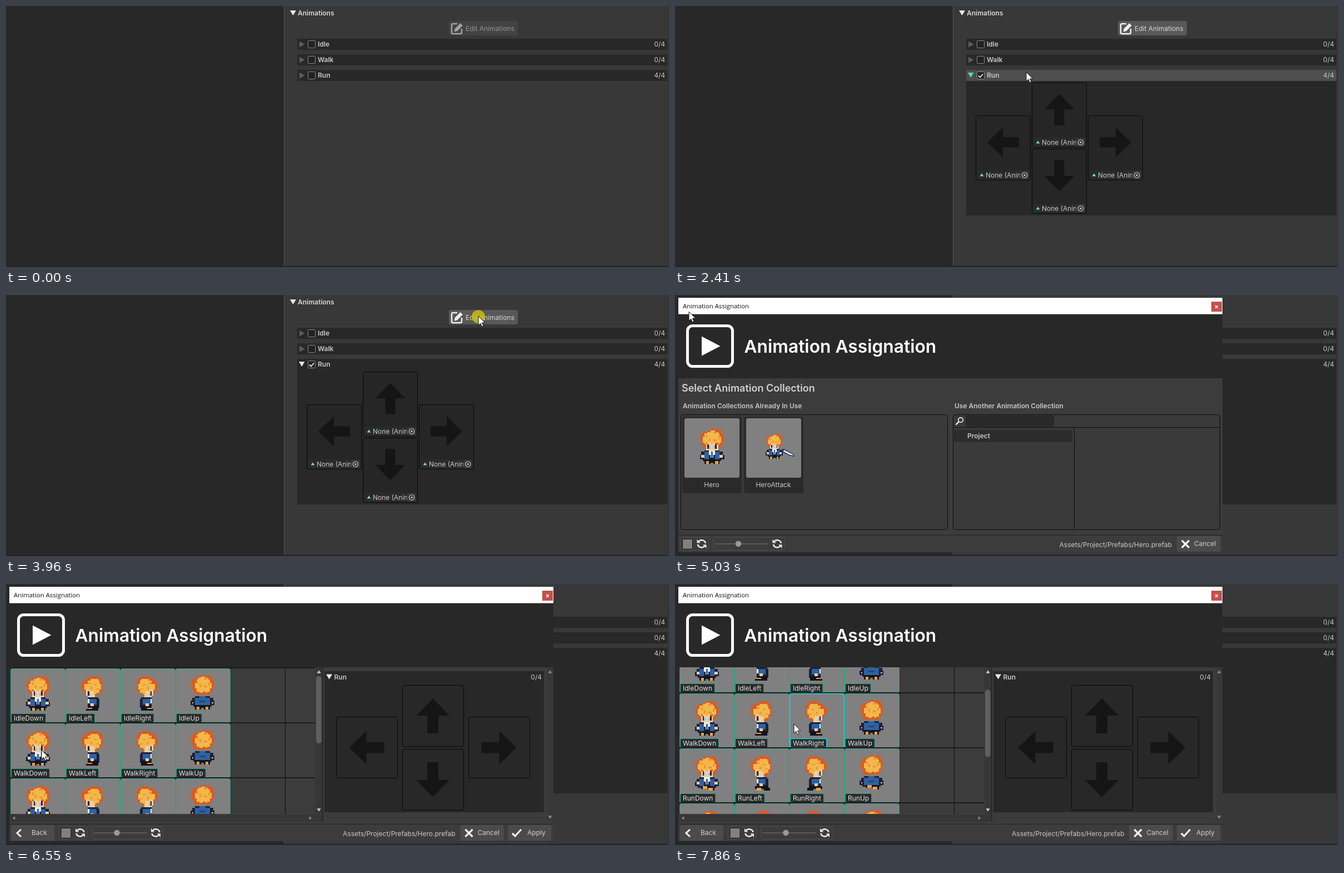
Recreate the animation shown at these times as an HTML page. Size 1193 by 470 pixels, loop 8 s.

```html
<!DOCTYPE html>
<html lang="en">
<head>
<meta charset="utf-8">
<title>Animation Assignation</title>
<style>
html, body { margin: 0; width: 100%; height: 100%; overflow: hidden; background: #282828; }
svg { display: block; width: 1193px; height: 470px; font-family: Inter, sans-serif; }
text { white-space: pre; }
.title { font-family: "Open Sans", sans-serif; }
.sprite { shape-rendering: crispEdges; }
.tile rect { stroke: #2ba487; }
.tile.on rect { stroke: #16d6d8; stroke-width: 1.6; }
.row .bar { fill: #282828; }
.row.on .bar { fill: #4e4e4e; }
.row .tri { fill: #5c5c5c; }
.row.open .tri { fill: #e4e4e4; }
.row.on .tri { fill: #3f8575; }
.row.on.open .tri { fill: #4fdcbc; }
</style>
</head>
<body>
<svg id="stage" viewBox="0 0 1193 470"></svg>
<script>
const LOOP = 8000, CELL = 99;
const TOGGLE = 1670, OPEN = 4060, ASSIGN = 6550;

// ---- drawing helpers ----
const rect = (x, y, w, h, fill, rx = 0, stroke = '') =>
  stroke
    ? `<rect x="${x + .5}" y="${y + .5}" width="${w - 1}" height="${h - 1}" rx="${rx}" fill="${fill}" stroke="${stroke}"/>`
    : `<rect x="${x}" y="${y}" width="${w}" height="${h}" rx="${rx}" fill="${fill}"/>`;
const path = (d, fill, more = '') => `<path d="${d}" fill="${fill}" ${more}/>`;
const line = (d, color, width = 1) => path(d, 'none', `stroke="${color}" stroke-width="${width}"`);
const text = (x, y, s, { size = 12, weight = 400, fill = '#c8c8c8', end = false, more = '' } = {}) =>
  `<text x="${x}" y="${y}" font-size="${size}" font-weight="${weight}" fill="${fill}" ${end ? 'text-anchor="end"' : ''} ${more}>${s}</text>`;
const group = (id, body, more = '') => `<g id="${id}" ${more}>${body}</g>`;
const at = (x, y, body, more = '') => `<g transform="translate(${x} ${y}) ${more}">${body}</g>`;
const bold = { weight: 600 };

const arrow = (x, y, deg, size = 1) =>
  at(x, y, path('M0-31.5 30-.5H10V31.5H-10V-.5H-30Z', '#151515'), `rotate(${deg}) scale(${size})`);

// ---- hero sprites, on a grid of about 16 by 23 units ----
const RED = '#dc5a20', GOLD = '#f2b84c', AMBER = '#f0942e', SKIN = '#f4cda2',
  INK = '#1c2038', BLUE = '#2f62a0', DARK = '#12131c', WHITE = '#e8eef4', BOOT = '#f0a233', EYE = '#8fc4dc';

const hairFront = path('M3 2h2v-1h2v-1h3v1h1v-1h2v1h2v1h-1v1h1v2h1v2h-1v3h-1v2h-1v1h-10v-1h-1v-2h-1v-3h-1v-2h1v-2h1z', RED);
const hairSpots = path('M4 4h1v2h-1zM9 2h2v1h-2zM12 5h1v2h-1zM6 6h1v2h-1zM9 7h2v1h-2z', AMBER);
const coat = path('M3 14h10v1h2v2h1v3h-2v1h-12v-1h-2v-3h1v-2h2z', INK);
const feet = run => run
  ? path('M4 20h8v1h1v2h-4v-1h-5z', DARK) + path('M5 20h3v2h-3zM9 21h3v2h-3z', BOOT)
  : path('M3 20h10v3h-4v-1h-2v1h-4z', DARK) + path('M4 21h2v2h-2zM10 21h2v2h-2z', BOOT);

const front = run => hairFront
  + path('M5 2h2v-1h3v1h2v1h1v2h1v4h-1v1h-1v-1h-2v1h-5v-1h-1v1h-1v-1h-1v-4h1v-2h2z', GOLD) + hairSpots
  + coat
  + path('M4 10h1v-1h2v1h2v-1h1v1h2v4h-8z', SKIN)
  + path('M5 10h1v3h-1zM10 10h1v3h-1z', INK) + path('M6 11h1v2h-1zM9 11h1v2h-1z', EYE)
  + path('M3 15h3v5h-3zM10 15h3v5h-3z', BLUE)
  + path('M6 14h4v3h-1v2h-2v-2h-1z', WHITE) + path('M7.5 15h1v4h-1z', BLUE)
  + path('M1 17h2v2h-2zM13 17h2v2h-2z', SKIN) + feet(run);

const back = run => coat
  + path('M3 15h3v-1h4v1h3v5h-10z', BLUE) + path('M6 17h4v1h-4z', '#23497e')
  + hairFront
  + path('M5 2h2v-1h3v1h2v1h1v2h1v4h-1v2h-2v1h-1v-1h-2v1h-2v-1h-2v-2h-1v-4h1v-2h1z', GOLD) + hairSpots
  + path('M1 18h1v1h-1zM14 18h1v1h-1z', SKIN) + feet(run);

const side = run =>
  path('M2 2h2v-1h2v-1h5v1h2v2h1v2h-1v1h1v4h-1v1h-2v2h-7v-1h-2v-3h-2v-5h2z', RED)
  + path('M4 3h2v-1h5v1h1v2h1v4h-1v2h-2v1h-3v-2h-3v-1h-2v-4h2z', GOLD)
  + path('M4 4h2v1h-2zM8 5h2v1h-2zM10 8h2v1h-2zM6 7h1v2h-1z', AMBER)
  + path('M4 14h7v1h1v6h-8z', INK)
  + path('M3 9h2v1h3v2h1v2h-5v-1h-1z', SKIN)
  + path('M4 10h1v3h-1z', INK) + path('M5 11h1v2h-1z', EYE)
  + path('M5 15h5v4h-5z', BLUE) + path('M4 15h1v3h-1z', WHITE) + path('M6 18h2v2h-2z', SKIN)
  + (run
    ? path('M3 20h9v1h1v2h-4v-1h-6z', DARK) + path('M4 21h3v2h-3z', BOOT)
    : path('M4 20h7v3h-8v-1h1z', DARK) + path('M4 21h3v1h-3z', BOOT));

const sprite = (x, y, size, body, flip) =>
  `<g class="sprite">${at(x, y, body, `scale(${flip ? -size : size} ${size})`)}</g>`;

// ---- icons ----
const refresh = (x, y) => at(x, y,
  line('M-7-1A7 6.5 0 0 1 5.5-4M7 1A7 6.5 0 0 1-5.5 4', '#e6e6e6', 2.6)
  + path('M8.5-8V-1.5H2ZM-8.5 8V1.5H-2Z', '#e6e6e6'), 'scale(-1 1)');
const cross = (x, y) => at(x, y, line('M-6.5-6.5 6.5 6.5M6.5-6.5-6.5 6.5', '#f4f4f4', 3.2));
const tri = (x, y, deg, fill, s = 1) => at(x, y, path('M0-3 4 3H-4Z', fill), `rotate(${deg}) scale(${s})`);

// ---- inspector ----
const rows = [['Idle', '0/4', 59], ['Walk', '0/4', 87], ['Run', '4/4', 115]];

function row([name, count, y], i) {
  return `<g class="row" id="row${i}">`
    + `<rect class="bar" x="524" y="${y}" width="666" height="20"/>`
    + `<path class="tri" d="M528 ${y + 4.5}l9.5 5.5-9.5 5.5z"/>`
    + rect(543, y + 3, 14, 14, '#222', 1, '#8a8a8a')
    + text(561, y + 14, name, bold) + text(1186, y + 14, count, { end: true }) + '</g>';
}

function clipCard(x, y, deg) {
  const fy = y + 99;
  return rect(x, y, 99, 117, '#262626', 3, '#080808') + arrow(x + 49.5, y + 48.5, deg, .9)
    + rect(x + 3, fy, 93, 17, '#2a2a2a', 2) + rect(x + 80, fy + 1, 16, 15, '#373737', 2)
    + tri(x + 11, fy + 8, 0, '#76e0c6', .85)
    + `<svg x="${x + 18}" y="${fy}" width="61.5" height="18">${text(0, 12.5, 'None (Animation Clip)')}</svg>`
    + `<circle cx="${x + 88}" cy="${fy + 8.5}" r="4.7" fill="none" stroke="#d0d0d0" stroke-width="1.1"/>`
    + `<circle cx="${x + 88}" cy="${fy + 8.5}" r="1.6" fill="#d0d0d0"/>`;
}

const editButton = group('edit',
  `<rect id="editBox" x="797" y="27" width="124" height="26" rx="3"/>`
  + group('editFace',
    line('M812 32H804.5Q802 32 802 34.5V47.5Q802 50 804.5 50H817.5Q820 50 820 47.5V41', '#f0f0f0', 2.5)
    + path('M806.5 46.5l1.2-5.5 9.8-10 4.3 4.2-9.9 10z', '#f0f0f0')
    + text(827, 44.5, 'Edit Animations', { fill: '#d8d8d8' })));

const inspector = rect(0, 0, 500, 470, '#282828') + rect(501, 0, 692, 470, '#383838')
  + rect(500, 0, 1, 470, '#555') + rect(0, 468, 1193, 2, '#232323') + rect(1191, 0, 2, 470, '#333')
  + path('M511 8h11l-5.5 9z', '#e8e8e8') + text(525, 17, 'Animations', { weight: 600, fill: '#d8d8d8' })
  + editButton + rows.map(row).join('')
  + group('clips', rect(524, 135, 666, 242, '#282828')
    + line('M546 125.5l3 3 5-6', '#f0f0f0', 1.8)
    + clipCard(642, 138, 0) + clipCard(642, 257, 180) + clipCard(541, 197, -90) + clipCard(743, 197, 90));

// ---- window ----
const button = (x, label, tx, icon) =>
  rect(x, 434, 78, 28, '#4b4b4b', 3) + icon + text(tx, 452, label, { fill: '#d0d0d0' });
const sliders = x => at(x, 0,
  rect(9, 436, 52, 24, '#3c3c3c', 4, '#4e4e4e') + rect(13, 439, 19, 19, '#808080', 1, '#161616') + refresh(48, 448)
  + rect(68, 436, 130, 24, '#3c3c3c', 4, '#4e4e4e') + rect(72, 447.5, 96, 1.5, '#646464')
  + '<circle cx="114" cy="448" r="5.3" fill="#999"/>' + refresh(184, 448));
const footer = x => button(903 + x, 'Cancel', 934 + x, cross(918.5 + x, 448.5))
  + text(894 + x, 453.5, 'Assets/Project/Prefabs/Hero.prefab', { end: true });

const frame = rect(6, 5, 979, 458, '#3c3c3c') + rect(6, 35, 979, 115, '#282828') + rect(6, 5, 979, 29.5, '#fff')
  + text(14, 24, 'Animation Assignation', { size: 11.4, fill: '#111', more: 'class="title"' })
  + rect(965, 12, 19, 18, '#c64f4d') + line('M972.3 18.8l4.4 5M976.7 18.8l-4.4 5', '#fff', 1.4)
  + '<rect x="22.5" y="55.5" width="81" height="73" rx="9" fill="none" stroke="#fff" stroke-width="5"/>'
  + path('M48 74.5 81.5 92 48 109.5Z', '#fff')
  + text(124.5, 104, 'Animation Assignation', { size: 31.75, weight: 600, fill: '#fff' })
  + rect(6, 432, 979, 1, '#232323');

const picture = (x, name, art, id = '') =>
  `<rect ${id} x="${x}" y="219" width="107" height="138" rx="4" fill="#2a2a2a"/>`
  + rect(x + 4, 222, 99, 107, '#808080', 3) + art
  + text(x + 53, 346, name, { more: 'text-anchor="middle"' });

const picker = text(12, 174, 'Select Animation Collection', { size: 18, weight: 600, fill: '#d0d0d0' })
  + text(14, 204, 'Animation Collections Already In Use', bold)
  + text(503, 204, 'Use Another Animation Collection', bold)
  + rect(10, 215, 481, 208, '#3a3a3a', 4, '#0c0c0c') + rect(500, 215, 481, 208, '#3a3a3a', 4, '#0c0c0c')
  + line('M500 238.5H981M718.5 238V423', '#0c0c0c')
  + rect(523, 217, 159, 20, '#2a2a2a', 3, '#222')
  + '<circle cx="514" cy="225" r="4.2" fill="none" stroke="#eee" stroke-width="1.7"/>' + line('M511 228 505.5 233.5', '#eee', 2.3)
  + rect(502, 243, 213, 22, '#2c2c2c', 3) + text(526, 258, 'Project', bold)
  + picture(13, 'Hero', sprite(44.5, 241, 2.75, front()), 'id="heroTile"')
  + picture(124, 'HeroAttack', sprite(163, 250, 1.95, front())
    + path('M190 279l5-2 18 9 2 5-7-1-15-7z', '#22355c') + path('M196 279l16 8 1 2-6-1-12-6z', '#dfeaf2'))
  + sliders(0) + footer(0);

const poses = [['Down', front, 28, 14], ['Left', side, 29, 14], ['Right', side, 67, 14], ['Up', back, 27, 12]];
const moves = ['Idle', 'Walk', 'Run', 'Attack'];

function tile(c, r) {
  const x = 8 + c * CELL, y = 152 + r * CELL, [dir, draw, dx, dy] = poses[c];
  return `<g class="tile" id="tile${c}${r}">` + rect(x, y, CELL, CELL, '#808080', 3, '#000')
    + sprite(x + dx, y + dy, 2.7, draw(r > 1), dir === 'Right')
    + rect(x + 1, y + 81, 60, 17, '#2a2a2a', 2, '#000')
    + text(x + 6, y + 93.5, moves[r] + dir, { fill: '#e4e4e4' }) + '</g>';
}

let grid = '';
for (let r = 0; r < 4; r++) {
  grid += line(`M8 ${151 + r * CELL}H556`, '#1c1c1c', 2);
  for (let c = 0; c < 4; c++) grid += tile(c, r);
}

const slot = (x, y, deg) => rect(x, y, 111, 111, '#282828', 3, '#080808') + arrow(x + 55, y + 55.5, deg);

const assign = rect(6, 150, 551, 264, '#3c3c3c')
  + `<g clip-path="url(#gridClip)">${line('M7.5 150V414M106.5 150V414M205.5 150V414M304.5 150V414M403.5 150V414M502.5 150V414', '#1c1c1c', 1.6)}${group('grid', grid)}</g>`
  + rect(557, 150, 12, 264, '#363636') + rect(6, 415, 563, 13, '#363636') + rect(569, 150, 1.5, 278, '#232323')
  + '<rect id="thumb" x="558" width="9.5" height="121" rx="4.5" fill="#5f5f5f"/>'
  + tri(563, 158, 0, '#c8c8c8', .9) + tri(563, 407, 180, '#c8c8c8', .9)
  + tri(14, 421.5, -90, '#888', .8) + tri(548, 421.5, 90, '#888', .8)
  + rect(974, 150, 11, 278, '#383838') + tri(979, 158, 0, '#888', .9) + tri(979, 420, 180, '#888', .9)
  + rect(573, 157, 395, 254, '#282828')
  + path('M576 162.5h11l-5.5 9z', '#e8e8e8') + text(590.5, 171.5, 'Run', bold) + text(964, 171.5, '0/4', { end: true })
  + slot(713, 182, 0) + slot(713, 297, 180) + slot(594, 239, -90) + slot(832, 239, 90)
  + button(9, 'Back', 46, line('M27 442l-7 6.5 7 6.5', '#f4f4f4', 3)) + sliders(85.5) + footer(-85.5)
  + button(903, 'Apply', 938, line('M911 449l5 5 11-12', '#f4f4f4', 3.2));

const pointer = path('M0 0V16.5L3.8 13 6.3 19 9 17.8 6.5 12H11.8Z', '#fff', 'stroke="#111" stroke-width="1"');

document.getElementById('stage').innerHTML =
  '<defs><clipPath id="gridClip"><rect x="6" y="150" width="550" height="264"/></clipPath></defs>'
  + inspector + group('win', frame + group('picker', picker) + group('assign', assign))
  + '<circle id="click" r="12" fill="#c4bb14" opacity=".88"/>' + group('cursor', pointer);

const $ = id => document.getElementById(id);

// fit each name tag to its text
document.querySelectorAll('.tile').forEach(g => {
  const w = g.querySelector('text').getComputedTextLength();
  g.querySelectorAll('rect')[1].setAttribute('width', w + 9);
});

// ---- motion: [from, to, x, y, ease] ----
const lin = p => p, out = p => 1 - (1 - p) ** 2, into = p => p ** 1.6, both = p => p * p * (3 - 2 * p);
const moveList = [
  [30, 820, 570, 151, out], [850, 940, 559, 138, lin], [940, 1180, 550, 124, out],
  [2180, 2410, 631, 119, into], [2410, 2970, 831, 40, out], [3000, 3120, 850, 38, out],
  [OPEN, OPEN, 350, 222, lin], [4660, 4900, 18, 36, both], [4900, 5030, 25, 30, out],
  [5300, 5710, 64, 299, both], [6590, 7240, 200, 238, both], [7270, 7330, 213, 236, out],
  [7470, 7860, 214, 252, both]
];
const clicks = [[1590, TOGGLE], [3960, OPEN], [6440, ASSIGN]];
const wheel = [7470, 7630, 7790];

function cursorAt(t) {
  let x = 1028, y = 463;
  for (const [a, b, tx, ty, ease] of moveList) {
    if (t < a) break;
    const p = t >= b ? 1 : ease((t - a) / (b - a));
    x += (tx - x) * p;
    y += (ty - y) * p;
  }
  return [x, y];
}

const show = (id, on) => { $(id).style.display = on ? '' : 'none'; };
const place = (id, x, y) => $(id).setAttribute('transform', `translate(${x} ${y})`);

function render(t) {
  const [x, y] = cursorAt(t);
  const open = t >= TOGGLE, inWindow = t >= OPEN, assigning = t >= ASSIGN;
  const scroll = 18 * wheel.filter(w => t >= w).length;

  place('cursor', Math.round(x), Math.round(y));
  show('cursor', t >= 30);
  place('click', x, y + 1);
  show('click', clicks.some(([a, b]) => t >= a && t < b));

  show('clips', open);
  $('editBox').setAttribute('fill', open ? '#585858' : '#434343');
  $('editFace').setAttribute('opacity', open ? 1 : .55);
  rows.forEach(([, , top], i) => {
    const g = $('row' + i), unfolded = open && i === 2;
    g.classList.toggle('on', !inWindow && x >= 524 && y >= top && y < top + 20);
    g.classList.toggle('open', unfolded);
    if (i === 2) g.querySelector('.tri').setAttribute('d', unfolded ? 'M527 120h10.5l-5.25 9z' : 'M528 119.5l9.5 5.5-9.5 5.5z');
  });

  show('win', inWindow);
  show('picker', !assigning);
  show('assign', assigning);
  $('heroTile').setAttribute('fill', x > 13 && x < 120 && y > 219 && y < 357 ? '#4a4a4a' : '#2a2a2a');

  place('grid', 0, -scroll);
  $('thumb').setAttribute('y', 166 + scroll * .455);
  const col = Math.floor((x - 8) / CELL), line = Math.floor((y + scroll - 152) / CELL);
  for (let c = 0; c < 4; c++)
    for (let r = 0; r < 4; r++)
      $(`tile${c}${r}`).classList.toggle('on', t >= 6590 && c === col && r === line);
}

const start = performance.now();
function tick() {
  render((performance.now() - start) % LOOP);
  requestAnimationFrame(tick);
}
render(0);
requestAnimationFrame(tick);
</script>
</body>
</html>
```
